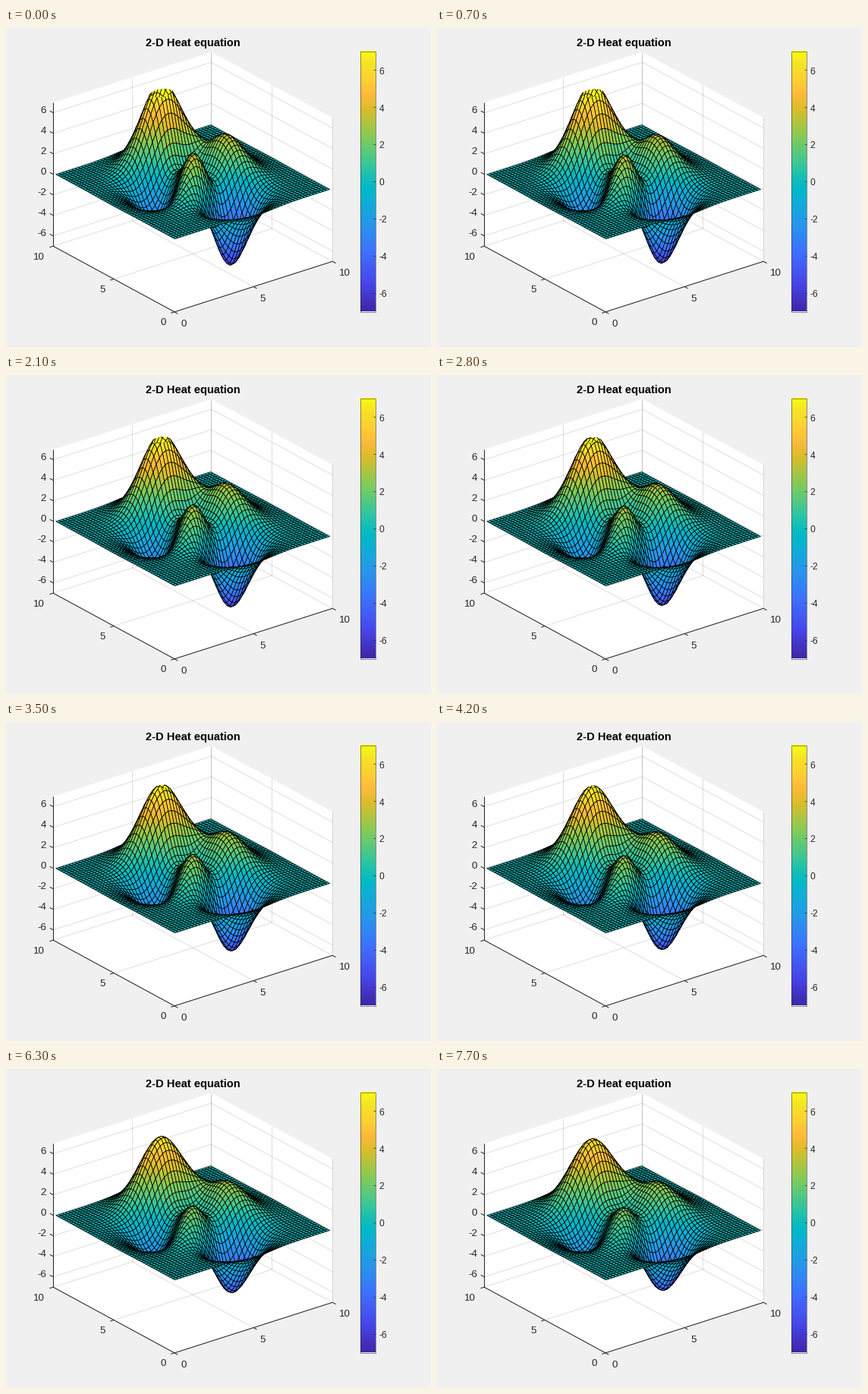
A matplotlib script that plays this animation: 560x420 px, repeating every 8 s.

```python
import numpy as np
import matplotlib.pyplot as plt
from matplotlib.animation import FuncAnimation
from matplotlib.collections import LineCollection, PolyCollection
from matplotlib.colors import LinearSegmentedColormap

W, H, DPI = 560, 420, 100
PX = 72 / DPI              # one pixel in points
INK = (0.15, 0.15, 0.15)
GRID = INK + (0.15,)
ZMAX = 7
FRAMES, INTERVAL, HOLD = 80, 100, 7
STEPS = -(-FRAMES // HOLD)

plt.rcParams["font.family"] = "Liberation Sans"

STOPS = [
    (0, (.2422, .1504, .6603)), (1 / 9, (.2803, .2782, .9221)),
    (2 / 9, (.2440, .4358, .9988)), (3 / 9, (.1540, .5902, .9218)),
    (4 / 9, (.0297, .7082, .8163)), (.470, (.0050, .7210, .7900)),
    (.508, (.0704, .7457, .7258)), (5 / 9, (.1938, .7758, .6251)),
    (6 / 9, (.5044, .7993, .3480)), (7 / 9, (.8634, .7406, .1596)),
    (.830, (.9820, .7290, .2340)), (.857, (.9970, .7659, .2199)),
    (8 / 9, (.9892, .8136, .1885)), (.950, (.9610, .8900, .1537)),
    (1, (.9769, .9839, .0805)),
]
CMAP = LinearSegmentedColormap.from_list("blue_yellow", STOPS, N=256)

# Orthographic view: azimuth -37.5, elevation 30, stretched to the axes area
ORIGIN = np.array([222.0, 373.8])
EX = np.array([20.82, -6.65])
EY = np.array([-15.98, -8.66])
EZ = np.array([0.0, -13.51])


def project(x, y, z):
    x, y, z = (np.asarray(v, float)[..., None] for v in (x, y, z))
    return ORIGIN + x * EX + y * EY + (z + ZMAX) * EZ


def peaks(x, y):
    return (3 * (1 - x) ** 2 * np.exp(-x**2 - (y + 1) ** 2)
            - 10 * (x / 5 - x**3 - y**5) * np.exp(-x**2 - y**2)
            - np.exp(-(x + 1) ** 2 - y**2) / 3)


def diffuse(u, r=0.25):
    v = u.copy()
    v[1:-1, 1:-1] += r * (u[2:, 1:-1] + u[:-2, 1:-1] + u[1:-1, 2:]
                          + u[1:-1, :-2] - 4 * u[1:-1, 1:-1])
    return v


N = 50
grid = np.linspace(0.1, 9.9, N)
X, Y = np.meshgrid(grid, grid)
s = np.linspace(-3, 3, N)
fields = [peaks(*np.meshgrid(s, s))]
while len(fields) < STEPS:
    fields.append(diffuse(fields[-1]))


def clip_cell(pts):
    """Cut a cell at z = ZMAX; return its outline and its mesh edges."""
    outline, edges = [], []
    for a, b in zip(pts, np.roll(pts, -1, axis=0)):
        ina, inb = a[2] <= ZMAX, b[2] <= ZMAX
        if ina:
            outline.append(a)
        if ina != inb:
            cut = a + (b - a) * (ZMAX - a[2]) / (b[2] - a[2])
            outline.append(cut)
            edges.append((a, cut) if ina else (cut, b))
        elif ina:
            edges.append((a, b))
    return np.array(outline), np.array(edges)


def surface(z):
    """Polygons, face colours and edge colours, far cells first."""
    xyz = np.stack([X, Y, z], axis=-1)
    cells = np.stack([xyz[:-1, :-1], xyz[:-1, 1:], xyz[1:, 1:], xyz[1:, :-1]], axis=2)
    cells = cells.reshape(-1, 4, 3)[::-1]
    shade = CMAP((cells[:, 0, 2] + ZMAX) / (2 * ZMAX))
    black, clear = (0, 0, 0, 1), (0, 0, 0, 0)
    polys, faces, lines = [], [], []

    def add(pts, face, line):
        polys.append(project(*pts.T))
        faces.append(face)
        lines.append(line)

    for pts, color in zip(cells, shade):
        above = pts[:, 2] > ZMAX
        if not above.any():
            add(pts[[0, 1, 2, 3, 0]], color, black)
        elif not above.all():
            outline, edges = clip_cell(pts)
            add(outline, color, clear)
            for edge in edges:
                add(edge, clear, black)
    return polys, faces, lines


fig = plt.figure(figsize=(W / DPI, H / DPI), dpi=DPI, facecolor="#f0f0f0")
ax = fig.add_axes([0, 0, 1, 1])
ax.axis("off")


def segments(segs, color, z, width=1.0):
    ax.add_collection(LineCollection(segs, colors=[color], linewidths=width * PX, zorder=z))


def label(x, y, text, px, ha, **kw):
    kw.setdefault("color", INK)
    ax.text(x, y + 0.345 * px, text, fontsize=px * PX, ha=ha, va="baseline", **kw)


# Walls and floor
hull = [project(*p) for p in [(0, 0, -7), (10, 0, -7), (10, 0, 7),
                              (10, 10, 7), (0, 10, 7), (0, 10, -7)]]
ax.add_patch(plt.Polygon(hull, fc="white", ec="none", zorder=0))

z_ticks = range(-6, 7, 2)
lines = []
for t in (0, 5, 10):
    lines.append([(t, 0, -7), (t, 10, -7)])
    lines.append([(0, t, -7), (10, t, -7)])
    lines.append([(t, 10, -7), (t, 10, 7)])
    lines.append([(10, t, -7), (10, t, 7)])
for t in z_ticks:
    lines.append([(0, 10, t), (10, 10, t), (10, 0, t)])
segments([[project(*p) for p in ln] for ln in lines], GRID, 1)

# Axis lines, ticks and tick labels
segments([[project(*p) for p in pair] for pair in [
    [(0, 10, 7), (0, 10, -7)], [(0, 10, -7), (0, 0, -7)], [(0, 0, -7), (10, 0, -7)]]], INK, 2)


def tick(p, way, text, dx, dy, ha):
    p = project(*p)
    segments([[p, p + 5 * way / np.hypot(*way)]], INK, 2)
    label(p[0] + dx, p[1] + dy, text, 13.33, ha)


for t in (0, 5, 10):
    tick((t, 0, -7), -EY, str(t), 8.7, 14.5, "left")
    tick((0, t, -7), -EX, str(t), -11.5, 13, "right")
for t in z_ticks:
    tick((0, 10, t), EY, str(t), -9, -4.6, "right")

label(246, 19, "2-D Heat equation", 14.67, "center", color="black", weight="bold")

# Colour bar
L, R, T, B = 467, 487, 31, 373.5
ax.imshow(np.linspace(1, 0, 256)[:, None], cmap=CMAP, extent=(L, R, B, T),
          aspect="auto", interpolation="nearest", zorder=2)
segments([[(L, T), (R, T), (R, B), (L, B), (L, T)]], INK, 3, 0.5)
for t in z_ticks:
    y = T + (ZMAX - t) / (2 * ZMAX) * (B - T)
    segments([[(R - 3.5, y), (R, y)]], INK, 3, 0.67)
    label(491.5, y + 1, str(t), 12, "left")
ax.set_xlim(0, W)
ax.set_ylim(H, 0)

mesh = PolyCollection([], closed=False, linewidths=0.75 * PX, zorder=4)
ax.add_collection(mesh, autolim=False)
scenes = [surface(z) for z in fields]


def update(i):
    polys, faces, edges = scenes[i // HOLD]
    mesh.set_verts(polys, closed=False)
    mesh.set_facecolor(faces)
    mesh.set_edgecolor(edges)
    return (mesh,)


anim = FuncAnimation(fig, update, frames=FRAMES, interval=INTERVAL,
                     repeat=True, repeat_delay=0, init_func=lambda: update(0))
plt.show()
```
